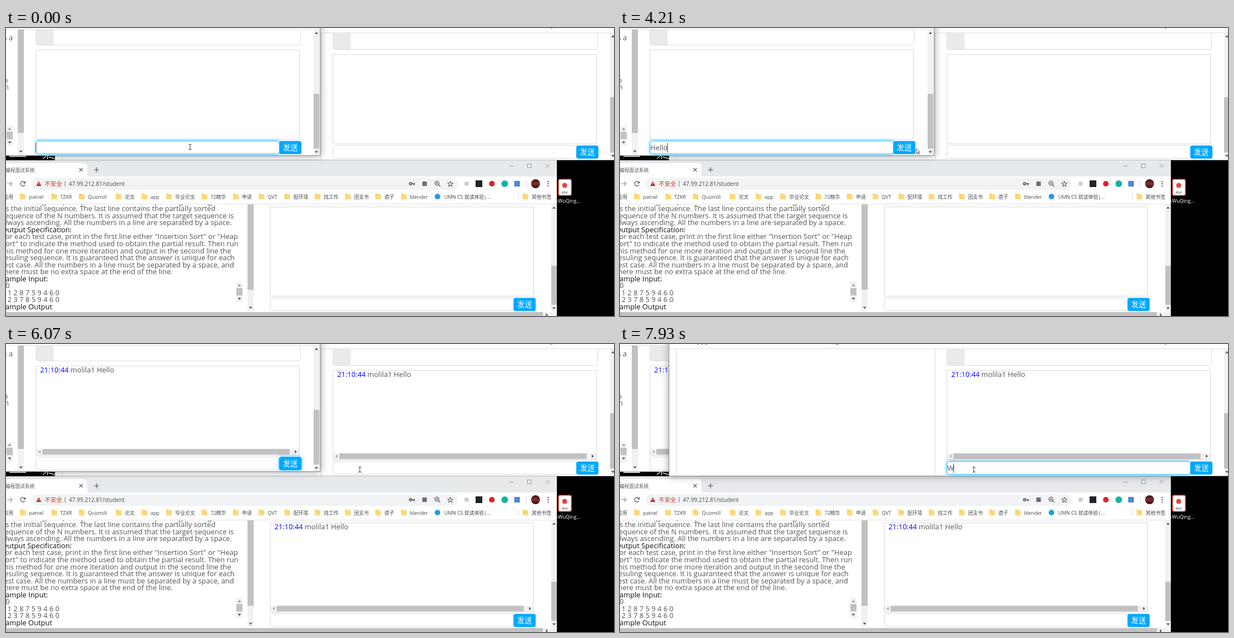
These frames come from a looping animation (1085x516 px, 8000 ms). An HTML page with a canvas:

```html
<!DOCTYPE html>
<html lang="zh">
<head>
<meta charset="utf-8">
<title>编程面试系统</title>
<style>
html, body { margin: 0; width: 100%; height: 100%; overflow: hidden; background: #fff; }
canvas { display: block; }
</style>
</head>
<body>
<canvas id="stage" width="1085" height="516"></canvas>
<script>
const ctx = document.getElementById('stage').getContext('2d');
const LOOP = 8000;
const FONT = '"Open Sans", "Noto Sans CJK SC", "Noto Sans CJK", sans-serif';
const BODY = 12.85, SMALL = 8.8;
const BLUE = '#00a8ff', GRAY = '#5f6368', TEXT = '#555';

// [time, text, caret]
const leftTyping = [
  [0, '', 1], [460, '', 0], [860, 'H', 1], [1410, 'H', 0], [1480, 'He', 1],
  [1630, 'Hel', 1], [1710, 'Hell', 1], [1880, 'Hello', 1], [2410, 'Hello', 0],
  [2960, 'Hello', 1], [3490, 'Hello', 0], [4010, 'Hello', 1], [4520, 'Hello', 0], [4900, '', 0]
];
const rightTyping = [[0, '', 0], [6630, '', 1], [7080, '', 0], [7630, '', 1], [7930, 'W', 1]];

// [step, x, y]
const toButton = [[0, 347, 213], [4, 455, 214], [7, 540, 217], [8, 547, 217], [10, 540, 216]];
const toInput = [[0, 526, 217], [3, 568, 221], [5, 613, 225], [7, 631, 225]];

function fill(color, x, y, w, h) {
  ctx.fillStyle = color;
  ctx.fillRect(x, y, w, h);
}
function line(color, width, ...p) {
  ctx.strokeStyle = color;
  ctx.lineWidth = width;
  ctx.beginPath();
  for (let i = 0; i < p.length; i += 2) ctx.lineTo(p[i], p[i + 1]);
  ctx.stroke();
}
function poly(color, ...p) {
  ctx.fillStyle = color;
  ctx.beginPath();
  for (let i = 0; i < p.length; i += 2) ctx.lineTo(p[i], p[i + 1]);
  ctx.closePath();
  ctx.fill();
}
function disc(color, x, y, r) {
  ctx.fillStyle = color;
  ctx.beginPath();
  ctx.arc(x, y, r, 0, 7);
  ctx.fill();
}
function ring(color, width, x, y, r, a = 0, b = 7) {
  ctx.strokeStyle = color;
  ctx.lineWidth = width;
  ctx.beginPath();
  ctx.arc(x, y, r, a, b);
  ctx.stroke();
}
function round(x, y, w, h, r) {
  ctx.beginPath();
  ctx.roundRect(x, y, w, h, r);
}
function text(s, x, y, size, color, align = 'left') {
  ctx.font = size + 'px ' + FONT;
  ctx.textAlign = align;
  ctx.fillStyle = color;
  ctx.fillText(s, x, y);
}
function arrow(x, y, dx, dy, color = '#505050') {
  poly(color, x + dx * 2, y + dy * 2,
    x - dx * 1.5 + dy * 3, y - dy * 1.5 + dx * 3,
    x - dx * 1.5 - dy * 3, y - dy * 1.5 - dx * 3);
}
function vbar(x, y, bottom, thumb, thumbEnd, w = 10) {
  fill('#f1f1f1', x, y, w, bottom - y);
  fill('#c1c1c1', x, thumb, w, thumbEnd - thumb);
  arrow(x + w / 2, bottom - 6, 0, 1);
}
function shadowed(blur, color, draw) {
  ctx.save();
  ctx.shadowBlur = blur;
  ctx.shadowColor = color;
  draw();
  ctx.restore();
}
function frame(x, y, w, h, active) {
  shadowed(active ? 13 : 6, active ? 'rgba(0,0,0,.38)' : 'rgba(0,0,0,.15)',
    () => fill(active ? '#8c8c8c' : '#b5b5b5', x, y, w, h));
  fill('#fff', x + 1, y, w - 2, h - 1);
}

function addon(x, y) {
  ctx.save();
  round(x + .5, y - 30.5, 472, 62, 4);
  ctx.clip();
  fill('#eaeaea', x, y - 30, 32, 62);
  ctx.restore();
  round(x + .5, y - 30.5, 472, 62, 4);
  ctx.strokeStyle = '#ddd';
  ctx.lineWidth = 1;
  ctx.stroke();
}

function chat(x, y, s) {
  ctx.lineWidth = 1;
  ctx.strokeStyle = '#d9d9d9';
  ctx.strokeRect(x + .5, y - .5, 470, 160);
  if (s.sent) {
    text('21:10:44', x + 8, y + 11, BODY, '#00f');
    text('molila1 Hello', x + 61.8, y + 11, BODY, TEXT);
    fill('#f1f1f1', x + 1, y + 148, 469, 11);
    fill('#c1c1c1', x + 12, y + 148, 441, 10);
    arrow(x + 7, y + 153, -1, 0, '#a3a3a3');
    arrow(x + 464, y + 153, 1, 0);
  }
  round(x + .5, y + 162.5, 434.5, 23, 4);
  ctx.fillStyle = '#fff';
  if (s.focus) shadowed(6, `rgba(0,168,255,${s.focus})`, () => ctx.fill());
  ctx.fill();
  ctx.strokeStyle = s.focus ? '#38b8fb' : '#d9d9d9';
  ctx.stroke();
  ctx.font = BODY + 'px ' + FONT;
  const input = s.input || '';
  const width = Math.round(ctx.measureText(input).width);
  text(input, x + 1, y + 179, BODY, TEXT);
  if (s.caret) fill('#444', x + width, y + 166, 1, 17);

  round(x + 434.7, y + 162.5, 39.5, 23.5, 3.5);
  ctx.fillStyle = BLUE;
  if (s.pressed) shadowed(6, 'rgba(0,168,255,.8)', () => ctx.fill());
  ctx.fill();
  text('发送', x + 454.5, y + 179, 13.2, '#fff', 'center');
}

function innerBar(x, y) {
  vbar(x, y, y + 36, y + 11, y + 24, 11);
  arrow(x + 5.5, y + 6, 0, -1, '#909090');
}

function desktop() {
  fill('#000', 0, 0, 1085, 516);
  fill('#ddd', 6, 229, 30, 2);
  line('#e8e8e8', 1.5, 66, 234, 72, 229);
  line('#e8e8e8', 1.5, 74, 229, 74, 235);
  line('#e8e8e8', 1.5, 76, 231, 87, 234);
  round(986, 271, 23, 29, 3);
  ctx.fillStyle = '#fff';
  ctx.fill();
  ctx.strokeStyle = '#e2463f';
  ctx.lineWidth = 1.6;
  ctx.stroke();
  disc('#e2463f', 997, 282, 4.5);
  text('PDF', 997, 296.5, 6, '#222', 'center');
  text('-WuQing...', 982.5, 313, SMALL, '#fff');
}

function leftWindow(active, s) {
  frame(-20, -20, 581, 249, active);
  fill('#e2e2e2', 0, 2, 559, 1);
  text('s a', -4.5, 22, BODY, TEXT);
  text('o', -4.5, 98, BODY, TEXT);
  text('n', -3, 110, BODY, TEXT);
  innerBar(1, 175);
  vbar(21, 3, 227, 3, 188, 11);
  ctx.save();
  ctx.beginPath();
  ctx.rect(34, 3, 520, 225);
  ctx.clip();
  addon(53, -1);
  ctx.restore();
  chat(53, 40, s);
  vbar(549, 3, 228, 118, 216);
  arrow(554, 9, 0, -1);
}

function rightWindow(active, s) {
  frame(87, -20, 1020, 257, active);
  for (const [x, w] of [[138, 3], [145, 2], [152, 4], [378, 1], [385, 5], [972, 3]])
    fill('#888', x, 0, w, 1);
  fill('#e0e0e0', 88, 8, 997, 1);
  fill('#ddd', 100, 8, 1, 228);
  fill('#ddd', 562, 8, 1, 228);
  ctx.save();
  ctx.beginPath();
  ctx.rect(563, 9, 522, 227);
  ctx.clip();
  addon(583, 7);
  ctx.restore();
  chat(583, 48, s);
  vbar(1078, 9, 235, 124, 223);
  arrow(1083, 15, 0, -1);
}

const problem = [
  'positive integer N (≤100). Then in the next line, N integers are given',
  'as the initial sequence. The last line contains the partially sorted',
  'sequence of the N numbers. It is assumed that the target sequence is',
  'always ascending. All the numbers in a line are separated by a space.',
  '#Output Specification:',
  'For each test case, print in the first line either "Insertion Sort" or "Heap',
  'Sort" to indicate the method used to obtain the partial result. Then run',
  'this method for one more iteration and output in the second line the',
  'resuling sequence. It is guaranteed that the answer is unique for each',
  'test case. All the numbers in a line must be separated by a space, and',
  'there must be no extra space at the end of the line.',
  '#Sample Input:',
  '10',
  '3 1 2 8 7 5 9 4 6 0',
  '1 2 3 7 8 5 9 4 6 0',
  '#Sample Output',
  'Insertion Sort'
];
const marks = [
  [25, 'patnel'], [81, 'TZKR'], [130, 'Quizmill'], [196, '论文'], [242, 'app'],
  [286, '毕业论文'], [349, '72精华'], [405, '申请'], [451, 'QVT'], [497, '配环境'],
  [551, '找工作'], [605, '团支书'], [659, '谱子'], [705, 'blender'], [922, '其他书签']
];

function toolbar() {
  fill('#e7eaed', 0, 237, 983, 29);
  round(-10, 242, 155, 30, 6);
  ctx.fillStyle = '#fff';
  ctx.fill();
  fill('#fff', 0, 266, 983, 50);
  text('编程面试系统', -1, 258, 8.7, '#55585c');
  line(GRAY, 1.2, 131, 251, 137, 257);
  line(GRAY, 1.2, 137, 251, 131, 257);
  line(GRAY, 1.3, 157, 254, 166, 254);
  line(GRAY, 1.3, 161.5, 249.5, 161.5, 258.5);
  line('#999', 1, 898, 247.5, 906, 247.5);
  ctx.strokeRect(930.5, 243.5, 7, 7);
  line('#999', 1, 963, 243.5, 970, 250.5);
  line('#999', 1, 970, 243.5, 963, 250.5);

  line('#999', 1.2, 2, 279, 11, 279);
  line('#999', 1.2, 7, 275, 11, 279, 7, 283);
  ring(GRAY, 1.4, 30, 279, 4, .5, 5.6);
  poly(GRAY, 35, 274, 35, 278.5, 30.5, 278.5);
  round(46, 269, 760, 21, 10.5);
  ctx.fillStyle = '#f1f3f4';
  ctx.fill();
  poly('#c5221f', 58.5, 274.5, 63, 283, 54, 283);
  fill('#fff', 58, 277.5, 1, 3);
  text('不安全', 69, 283, 10.4, '#d0362b');
  fill('#777', 105, 274, 1, 10);
  text('47.99.212.81/student', 112, 283, 10.1, '#4a4d51');

  ring(GRAY, 1.8, 722, 279, 2);
  line(GRAY, 1.8, 724, 279, 730, 279);
  line(GRAY, 1.6, 728, 279, 728, 282);
  fill('#6b6f74', 743, 275, 8, 8);
  ring(GRAY, 1.3, 769, 278, 3.6);
  line(GRAY, 1.4, 771.5, 280.5, 775, 284);
  line(GRAY, 1, 767, 278, 771, 278);
  line(GRAY, 1, 769, 276, 769, 280);
  const star = [];
  for (let i = 0; i < 11; i++) {
    const r = i % 2 ? 2.2 : 5, a = i * Math.PI / 5 - Math.PI / 2;
    star.push(793 + r * Math.cos(a), 279.5 + r * Math.sin(a));
  }
  line(GRAY, 1.1, ...star);

  disc('#cfcfcf', 822, 279, 4);
  fill('#20232a', 838, 273, 12, 12);
  disc('#e0202a', 867, 279, 5);
  disc('#13b5a0', 890, 279, 6);
  fill('#4f87d6', 907, 274, 10, 10);
  fill('#ddd', 928, 272, 1, 14);
  const face = ctx.createLinearGradient(0, 271, 0, 287);
  face.addColorStop(0, '#2a1a1c');
  face.addColorStop(.5, '#8a2a2a');
  face.addColorStop(1, '#1c1416');
  disc(face, 945, 279, 8);
  for (const y of [275, 279, 283]) disc(GRAY, 967.5, y, 1.2);

  text('应用', -4.5, 306, SMALL, '#45494d');
  for (const [x, label] of marks) {
    round(x, 297, 5, 4, 1);
    ctx.fillStyle = '#eebf4d';
    ctx.fill();
    round(x, 298, 10, 9, 1);
    ctx.fillStyle = '#f9d978';
    ctx.fill();
    text(label, x + 16, 306, SMALL, '#45494d');
  }
  disc('#2b9be0', 770, 302, 5);
  text('UMN CS 就读体验|...', 782, 306, SMALL, '#45494d');
  fill('#ddd', 914, 296, 1, 12);
  fill('#e3e3e3', 0, 315, 983, 1);
}

function lowerWindow(s) {
  fill('#fff', 0, 237, 983, 279);
  toolbar();
  ctx.save();
  ctx.beginPath();
  ctx.rect(0, 316, 983, 192);
  ctx.clip();
  problem.forEach((row, i) => {
    const head = row[0] === '#';
    text(head ? row.slice(1) : row, -8, Math.round(315.6 + i * 12.56), BODY, head ? '#111' : TEXT);
  });
  innerBar(411, 455);
  vbar(431, 316, 507, 316, 469, 11);
  chat(471, 321, s);
  vbar(973, 316, 508, 426, 496);
  arrow(978, 322, 0, -1);
  ctx.restore();
  fill('#f1f1f1', 0, 509, 983, 7);
  fill('#c1c1c1', 0, 509, 958, 7);
  arrow(965, 514, 1, 0);
}

const at = (list, t) => list.filter(e => e[0] <= t).pop();

function along(path, k) {
  const i = Math.max(1, path.findIndex(p => p[0] >= k));
  const a = path[i - 1], b = path[i], f = (k - a[0]) / (b[0] - a[0]);
  return [a[1] + (b[1] - a[1]) * f, a[2] + (b[2] - a[2]) * f];
}

function pointer(t) {
  const step = (start, last) => Math.min(last, Math.floor((t - start) / 77 + .01));
  if (t < 3360) return [328, 213];
  if (t < 4210) return along(toButton, step(3360, 10));
  if (t < 4290) return [529, 216];
  if (t < 5530) return [521, 216];
  return along(toInput, step(5530, 7));
}

function cursor(x, y) {
  x = Math.round(x);
  y = Math.round(y);
  const beam = x < 488 || x > 583;
  if (beam) {
    line('#444', 1, x + .5, y - 4, x + .5, y + 4);
    line('#444', 1, x - 2, y - 4.5, x + 3, y - 4.5);
    line('#444', 1, x - 2, y + 4.5, x + 3, y + 4.5);
    return;
  }
  const shape = [0, 0, 0, 9, 2, 7.2, 3.4, 10.4, 4.9, 9.8, 3.6, 6.6, 6, 6.5]
    .map((v, i) => v + (i % 2 ? y : x));
  poly('#fff', ...shape);
  line('#222', .8, ...shape, x, y);
}

function draw(t) {
  const sent = t >= 4990, raised = t >= 6450;
  const [, leftText, leftCaret] = at(leftTyping, t);
  const [, rightText, rightCaret] = at(rightTyping, t);
  const left = { sent, input: leftText, caret: leftCaret, focus: t < 4750 ? .8 : 0, pressed: t >= 4750 };
  const right = { sent, input: rightText, caret: rightCaret, focus: t < 6630 ? 0 : t < 6690 ? .5 : .8 };

  desktop();
  if (raised) {
    leftWindow(false, left);
    lowerWindow({ sent });
    rightWindow(true, right);
  } else {
    rightWindow(false, right);
    lowerWindow({ sent });
    leftWindow(true, left);
  }
  const [x, y] = pointer(t);
  const click = (t >= 4750 && t < 4900) || (t >= 6450 && t < 6630);
  if (click) disc('rgba(244,236,50,.75)', x, y, 9);
  cursor(x, y);
}

function tick() {
  draw(performance.now() % LOOP);
  requestAnimationFrame(tick);
}
tick();
</script>
</body>
</html>
```
